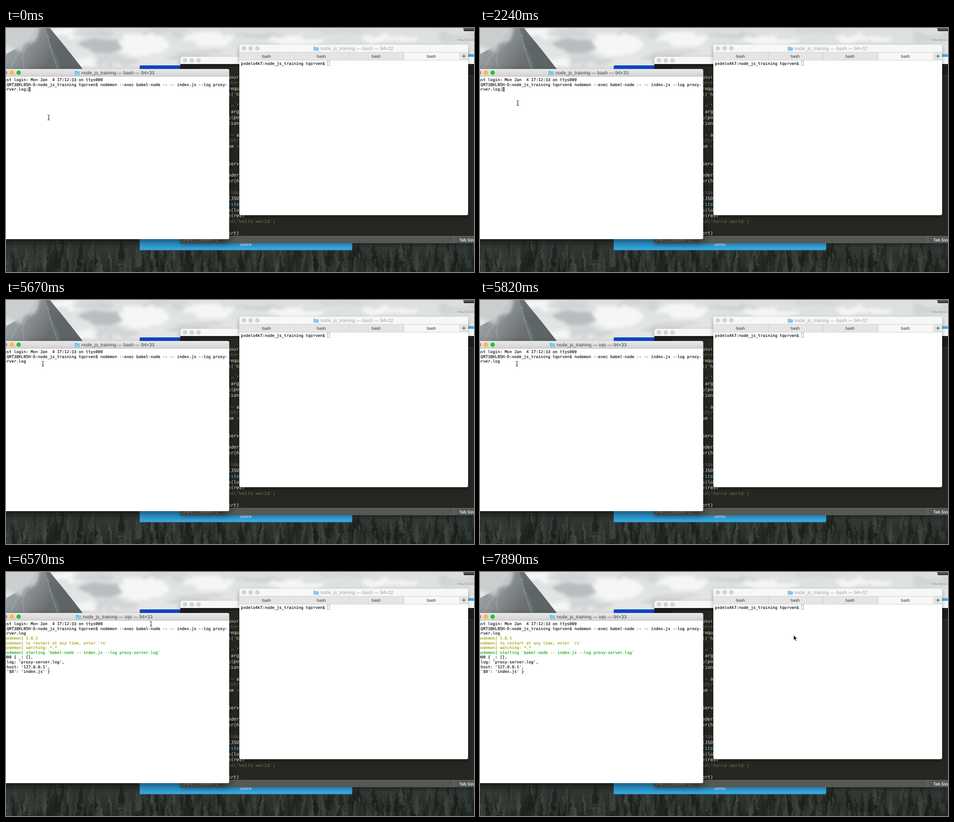
Write an HTML page that moves like this. It is 1033 by 542 pixels and loops after 8 s.

```html
<!DOCTYPE html>
<html lang="en">
<head>
<meta charset="utf-8">
<title>Terminal session</title>
<style>
html, body { margin: 0; width: 100%; height: 100%; overflow: hidden; background: #2a302c; }
svg { display: block; width: 1033px; height: 542px; }
text { white-space: pre; text-rendering: geometricPrecision; }
.mono { font-family: "DejaVu Sans Mono", monospace; font-size: 8.8px; stroke: currentColor; stroke-width: .15px; }
.code { font-family: "DejaVu Sans Mono", monospace; font-size: 10.2px; }
.sans { font-family: "Liberation Sans", Arial, sans-serif; font-size: 10.44px; }
.small { font-family: "Open Sans", sans-serif; font-size: 9px; }
</style>
</head>
<body>
<svg viewBox="0 0 1033 542">
  <defs>
    <linearGradient id="sky" x2="0" y2="1">
      <stop stop-color="#dcdfdf"/><stop offset=".2" stop-color="#e9ebea"/>
    </linearGradient>
    <linearGradient id="rock" x2="1" y2=".35">
      <stop stop-color="#a9aeb0"/><stop offset=".4" stop-color="#8b9193"/><stop offset=".75" stop-color="#686e71"/>
    </linearGradient>
    <linearGradient id="forest" x2="0" y2="1">
      <stop stop-color="#2c332f"/><stop offset=".5" stop-color="#323833"/><stop offset="1" stop-color="#222823"/>
    </linearGradient>
    <linearGradient id="panel" x2="0" y2="1">
      <stop stop-color="#0d48ce"/><stop offset=".5" stop-color="#1477d4"/><stop offset="1" stop-color="#35aae2"/>
    </linearGradient>
    <linearGradient id="bar" x2="0" y2="1">
      <stop stop-color="#eaeaea"/><stop offset="1" stop-color="#d2d2d2"/>
    </linearGradient>
    <filter id="cloud" x="-20%" y="-50%" width="140%" height="200%">
      <feTurbulence type="fractalNoise" baseFrequency=".02 .04" numOctaves="3" seed="7"/>
      <feDisplacementMap in="SourceGraphic" scale="32" xChannelSelector="R" yChannelSelector="G"/>
      <feGaussianBlur stdDeviation="3.5"/>
    </filter>
    <filter id="soft"><feGaussianBlur stdDeviation=".7"/></filter>
    <filter id="foliage" x="0" y="0" width="100%" height="100%">
      <feTurbulence type="fractalNoise" baseFrequency=".13 .09" numOctaves="3" seed="12" result="noise"/>
      <feDisplacementMap in="SourceGraphic" in2="noise" scale="9" xChannelSelector="R" yChannelSelector="G"/>
      <feGaussianBlur stdDeviation=".6"/>
    </filter>
    <filter id="activeShadow" x="-20%" y="-20%" width="140%" height="140%">
      <feDropShadow dx="0" dy="8" stdDeviation="9" flood-opacity=".5"/>
    </filter>
    <filter id="idleShadow" x="-20%" y="-20%" width="140%" height="140%">
      <feDropShadow dx="0" dy="4" stdDeviation="5" flood-opacity=".32"/>
    </filter>
    <clipPath id="gap"><path d="M492 107H1033V462H492Z"/></clipPath>
  </defs>

  <rect width="1033" height="542" fill="url(#sky)"/>
  <g id="clouds" filter="url(#cloud)"></g>
  <g filter="url(#soft)">
    <path d="M0 58L28 42L50 24L66 0H97L108 14L127 37L146 61L170 92H0Z" fill="url(#rock)"/>
    <path d="M97 0L108 14L127 37L146 61L170 92H122L112 60L96 34L88 0Z" fill="#555c60" opacity=".5"/>
    <path d="M70 8L54 38L24 62L8 92M92 14L98 44L114 90M46 36L36 66L40 92" fill="none" stroke="#b4b8b9" stroke-width="3" opacity=".3"/>
  </g>
  <ellipse cx="20" cy="14" rx="52" ry="30" fill="#c9cdce" opacity=".9" filter="url(#cloud)"/>
  <rect y="440" width="1033" height="102" fill="url(#forest)"/>
  <g id="trees" filter="url(#foliage)"></g>

  <g>
    <path d="M1009 0H1033V7H1011Z" fill="#55595a"/>
    <path d="M1010 4H1033V7H1011Z" fill="#2f3233"/>
    <text class="small" x="997" y="25.5" font-weight="700" fill="#fff" style="text-shadow:0 1px 2px #555">Hard disk</text>
  </g>

  <rect x="295" y="83" width="469" height="410.5" rx="3" fill="url(#panel)"/>
  <text class="sans" x="529.5" y="484" font-weight="700" text-anchor="middle" fill="#e6f5fc" style="font-size:10px">zelvo</text>
  <rect x="1000" y="58" width="33" height="8" fill="#43b0e4"/>

  <g filter="url(#idleShadow)">
    <path d="M385 478V68Q385 64 389 64H1040V478Z" fill="#272822"/>
    <path d="M385 80V68Q385 64 389 64H1040V80Z" fill="#f7f7f7"/>
    <rect x="385" y="80" width="655" height="27" fill="#1d1e1a"/>
    <path d="M418 107C424 107 422 86 430 86H600V107Z" fill="#282923"/>
    <rect x="1020" y="106" width="20" height="1" fill="#44453f"/>
    <rect x="385" y="462" width="655" height="16" fill="#575856"/>
    <rect x="385" y="462" width="655" height="1" fill="#6b6c6a"/>
    <rect x="988" y="463" width="1" height="15" fill="#777"/>
  </g>
  <g id="editorButtons"></g>
  <text class="small" x="387" y="473.5" fill="#c8c8c8">Line 31, Column 13</text>
  <text class="small" x="1001" y="473.5" font-weight="600" fill="#fff">Tab Size: 2</text>
  <g id="code" clip-path="url(#gap)"></g>

  <g filter="url(#idleShadow)">
    <rect x="515" y="37" width="505" height="378.7" rx="4" fill="#fff"/>
    <path d="M515 54V41Q515 37 519 37H1016Q1020 37 1020 41V54Z" fill="#f7f7f7"/>
    <rect x="515" y="54" width="505" height="17.5" fill="#e5e5e5"/>
    <rect x="878" y="54" width="123" height="17.5" fill="#f7f7f7"/>
    <path d="M515 54H1020M515 71.5H1020M636.5 54V71M757.5 54V71M878.5 54V71M1001.5 54V71" stroke="#c6c6c6" stroke-width=".8"/>
    <path d="M1006.5 62.5H1015M1010.7 58.2V66.8" stroke="#333" stroke-width="1.1"/>
  </g>
  <g id="idleTitle"></g>
  <text class="mono" x="518.5" y="81.7">pxdelo4k7:node_js_training tqorven$</text>
  <rect x="709.5" y="73.5" width="5" height="10" fill="none" stroke="#999" stroke-width=".9"/>

  <g filter="url(#activeShadow)">
    <path d="M-20 91H488.5Q492.5 91 492.5 95V466Q492.5 469 489.5 469H-20Z" fill="#fff"/>
    <path d="M-20 107.5V91H488.5Q492.5 91 492.5 95V107.5Z" fill="url(#bar)"/>
    <rect x="-20" y="107" width="512.5" height=".8" fill="#b4b4b4"/>
  </g>
  <circle cx="-2.5" cy="99.3" r="5" fill="#fc5b57"/>
  <circle cx="12.7" cy="99.3" r="4.8" fill="#fdbc2e"/>
  <circle cx="28" cy="99.3" r="4.8" fill="#28c231"/>
  <g id="bashTitle"></g>
  <g id="iojsTitle"></g>
  <g id="log"></g>
  <rect id="block" y="131" width="5.3" height="10.3" fill="#808080"/>

  <path id="ibeam" d="M-2.5 -5.6Q0 -5.6 0 -4Q0 -5.6 2.5 -5.6M0 -4.5V4.5M-2.5 5.6Q0 5.6 0 4Q0 5.6 2.5 5.6M-1.2 1.5H1.2" fill="none" stroke="#222"/>
  <path id="arrow" d="M0 0V11L2.5 8.7L4.4 13L6.2 12.2L4.4 8.1H7.8Z" stroke="#fff" stroke-width=".7"/>
</svg>
<script>
const LOOP = 8000;
const $ = id => document.getElementById(id);

function add(parent, tag, attrs, text) {
  const el = document.createElementNS("http://www.w3.org/2000/svg", tag);
  for (const key in attrs) el.setAttribute(key, attrs[key]);
  if (text !== undefined) el.textContent = text;
  return parent.appendChild(el);
}

function seeded(seed) {
  return () => (seed = (seed * 16807) % 2147483647) / 2147483647;
}

function drawClouds() {
  const tones = { w: "#f8f9f8", l: "#cfd3d4", d: "#b2b7ba" };
  const puffs = [
    ["w", 140, 12, 40, 12], ["d", 208, 40, 46, 18], ["l", 190, 10, 45, 8], ["l", 245, 70, 50, 10],
    ["w", 305, 36, 55, 22], ["l", 350, 9, 52, 7], ["l", 415, 60, 60, 9], ["w", 445, 25, 55, 13],
    ["l", 555, 18, 60, 6], ["w", 640, 27, 65, 8], ["l", 745, 8, 60, 6], ["w", 850, 24, 65, 9],
    ["l", 1000, 22, 45, 12], ["w", 175, 80, 30, 8]
  ];
  for (const [tone, cx, cy, rx, ry] of puffs)
    add($("clouds"), "ellipse", { cx, cy, rx, ry, fill: tones[tone], opacity: .85 });
}

function drawTrees() {
  const rnd = seeded(41);
  const fills = ["#474e47", "#3a413b", "#2a302b", "#1c211d", "#181d19"];
  for (let i = 0; i < 450; i++) {
    const x = rnd() * 1053 - 10, top = 458 + i / 8 + rnd() * 20, width = 5 + rnd() * 6;
    const left = [], right = [];
    for (let k = 1; k < 7; k++) {
      const y = top + k * 8, half = width * k / 6;
      left.push(`${x - half} ${y}`, `${x - half / 2} ${y - 1}`);
      right.unshift(`${x + half / 2} ${y - 1}`, `${x + half} ${y}`);
    }
    add($("trees"), "path", {
      d: `M${x} ${top}L${left.join("L")}L${right.join("L")}Z`,
      fill: fills[Math.floor(rnd() * fills.length)], opacity: .6
    });
  }
}

function drawButtons(parent, x, y) {
  for (let i = 0; i < 3; i++)
    add(parent, "circle", { cx: x + 15 * i, cy: y, r: 4.5, fill: "#d4d4d4", stroke: "#bdbdbd", "stroke-width": .6 });
}

function drawTitle(parent, x, y, label, fill, opacity) {
  add(parent, "path", { d: `M${x} ${y - 4}h4l1 1.3h6.5v7.7h-11.5z`, fill: "#58b7e4", opacity });
  add(parent, "path", { d: `M${x} ${y - 1.5}h11.5v6.5h-11.5z`, fill: "#7dcdf2", opacity });
  add(parent, "text", { class: "sans", x: x + 15, y: y + 3.5, fill }, `node_js_training — ${label}`);
}

// Each row: line index, then colour/text pairs.
function drawCode() {
  const W = "#f1f1ea", G = "#75715e", P = "#f92672", C = "#66d9ef", Y = "#e6db74";
  const rows = [
    [0, W, "quir"], [1, G, "gh=r"], [2, W, "requ"], [3, W, "t(", Y, "'h"],
    [5, P, " = ", Y, "'"], [6, W, " arg"], [7, C, "g", W, "(po"], [8, W, "tion"],
    [10, P, " = ", W, "a"], [11, G, "gStr"], [12, W, "am ", P, "="], [15, W, "Serv"],
    [17, W, "ader"], [18, W, "er(h"], [20, G, "stdo"], [21, W, "(JSO"], [22, C, "rite"],
    [23, W, "e(lo"], [24, W, "e(res)"], [25, G, "nd('hello world')"], [27, W, "ort)"]
  ];
  for (const [line, ...parts] of rows) {
    const el = add($("code"), "text", { class: "code", x: 490, y: 112 + line * 12.85 });
    for (let i = 0; i < parts.length; i += 2) add(el, "tspan", { fill: parts[i] }, parts[i + 1]);
  }
}

const OLIVE = "#999900", GREEN = "#00a600";
const logLines = [
  [0, "Last login: Mon Jan  4 17:12:33 on ttys000"],
  [0, "A-QRT38KLB5H-D:node_js_training tqorven$ nodemon --exec babel-node -- -- index.js --log proxy-"],
  [0, "server.log"],
  [5970, "[nodemon] 1.8.1", OLIVE],
  [5970, "[nodemon] to restart at any time, enter `rs`", OLIVE],
  [5970, "[nodemon] watching: *.*", OLIVE],
  [5970, "[nodemon] starting `babel-node -- index.js --log proxy-server.log`", GREEN],
  [6570, "5000 { _: [],"],
  [6570, "  log: 'proxy-server.log',"],
  [6570, "  host: '127.0.0.1',"],
  [6570, "  '$0': 'index.js' }"]
];

// Pointer stops: start time, shape, x, y.
const stops = [
  [0, "ibeam", 94.3, 199], [500, "ibeam", 72.7, 193.5], [670, "none", 0, 0],
  [2240, "ibeam", 83.4, 167], [2530, "ibeam", 81.5, 142.3], [2680, "ibeam", 81.5, 141.7],
  [6570, "ibeam", 320, 115.5], [6720, "ibeam", 387.8, 118.7], [6860, "ibeam", 475.2, 134.7],
  [7010, "arrow", 552.3, 180.7], [7300, "arrow", 670.7, 160.7],
  [7450, "arrow", 672.3, 147.2], [7890, "arrow", 692.3, 140.3]
];

drawClouds();
drawTrees();
drawCode();
drawButtons($("editorButtons"), 395, 72);
drawButtons($("idleTitle"), 525, 45.3);
drawTitle($("idleTitle"), 679, 45.5, "bash — 94×32", "#a2a2a2", .75);
for (const x of [575, 696, 817, 939])
  add($("idleTitle"), "text", { class: "sans", x, y: 66, "text-anchor": "middle", fill: "#333", style: "font-size:9.2px" }, "bash");
drawTitle($("bashTitle"), 151.5, 99.5, "bash — 94×33", "#444", 1);
drawTitle($("iojsTitle"), 154.5, 99.5, "iojs — 94×33", "#444", 1);

const logEls = logLines.map(([, text, color = "#000"], i) =>
  add($("log"), "text", { class: "mono", x: -9, y: 118.2 + i * 10.6, color, fill: color }, text));

function show(el, visible) {
  el.setAttribute("visibility", visible ? "visible" : "hidden");
}

function render(t) {
  logEls.forEach((el, i) => show(el, t >= logLines[i][0]));
  const typed = t < 4030 ? "server.log;" : "server.log";
  logEls[2].textContent = typed;
  $("block").setAttribute("x", -9 + typed.length * 5.298);
  show($("block"), t < 5670);
  show($("bashTitle"), t < 5820);
  show($("iojsTitle"), t >= 5820);

  const [, shape, x, y] = stops.filter(stop => stop[0] <= t).pop();
  for (const id of ["ibeam", "arrow"]) {
    show($(id), id === shape);
    $(id).setAttribute("transform", `translate(${x} ${y})`);
  }
}

const start = performance.now();
function tick() {
  render((performance.now() - start) % LOOP);
  requestAnimationFrame(tick);
}
tick();
</script>
</body>
</html>
```
